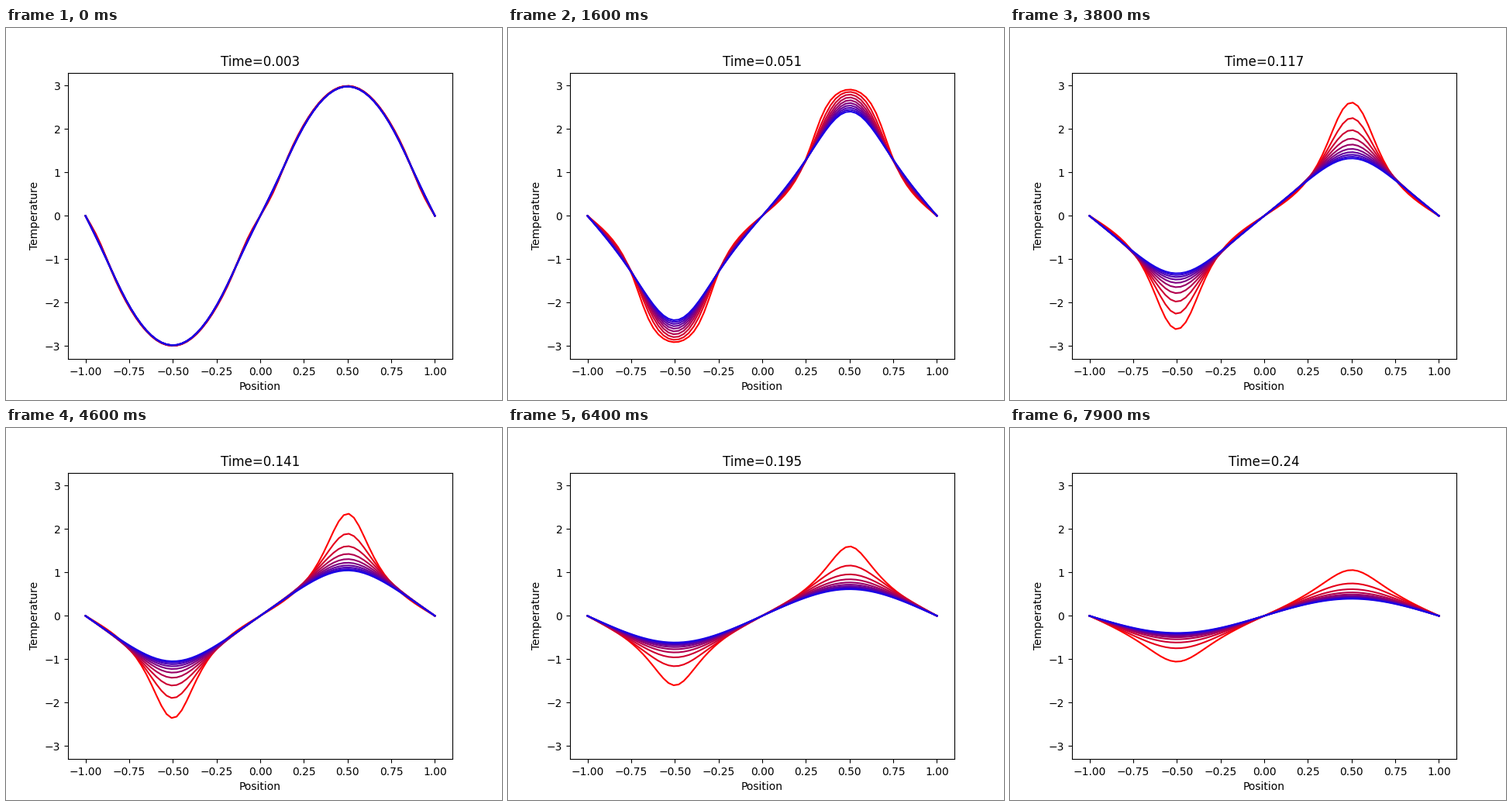
Animation of 640 by 480 pixels, one loop 8 s. Source, as a matplotlib script:

```python
import numpy as np
import matplotlib.pyplot as plt
from matplotlib.animation import FuncAnimation

FRAMES = 80
INTERVAL = 100      # ms
DT = 0.003          # simulated time per frame
SUBSTEPS = 10
POINTS = 70
CURVES = 10

# Heat flow u_t = (u_x / (1 + u^2 / a))_x, one row per value of a
x = np.linspace(-1, 1, POINTS)
a = (0.5 + 0.25 * np.arange(CURVES))[:, None]
root = np.sqrt(a)
ratio = DT / SUBSTEPS / (x[1] - x[0]) ** 2


def advance(u):
    """Move all curves on by one frame, ends held at zero."""
    u = u.copy()
    for _ in range(SUBSTEPS):
        potential = root * np.arctan(u / root)
        u[:, 1:-1] += ratio * np.diff(potential, 2, axis=1)
    return u


def solve():
    u = np.tile(3 * np.sin(np.pi * x), (CURVES, 1))
    u[:, [0, -1]] = 0
    states = []
    for _ in range(FRAMES):
        u = advance(u)
        states.append(u)
    return states


states = solve()

fig, ax = plt.subplots(figsize=(6.4, 4.8), dpi=100)
ax.set(xlim=(-1.1, 1.1), ylim=(-3.3, 3.3),
       xlabel="Position", ylabel="Temperature")
title = ax.set_title("")
lines = [ax.plot([], [], lw=1.5, color=(1 - i / CURVES, 0, i / CURVES))[0]
         for i in range(CURVES)]


def draw(frame):
    for line, u in zip(lines, states[frame]):
        line.set_data(x, u)
    title.set_text(f"Time={round((frame + 1) * DT, 3)}")
    return [*lines, title]


anim = FuncAnimation(fig, draw, frames=FRAMES, init_func=lambda: draw(0),
                     interval=INTERVAL, repeat=True, repeat_delay=0)
plt.show()
```
